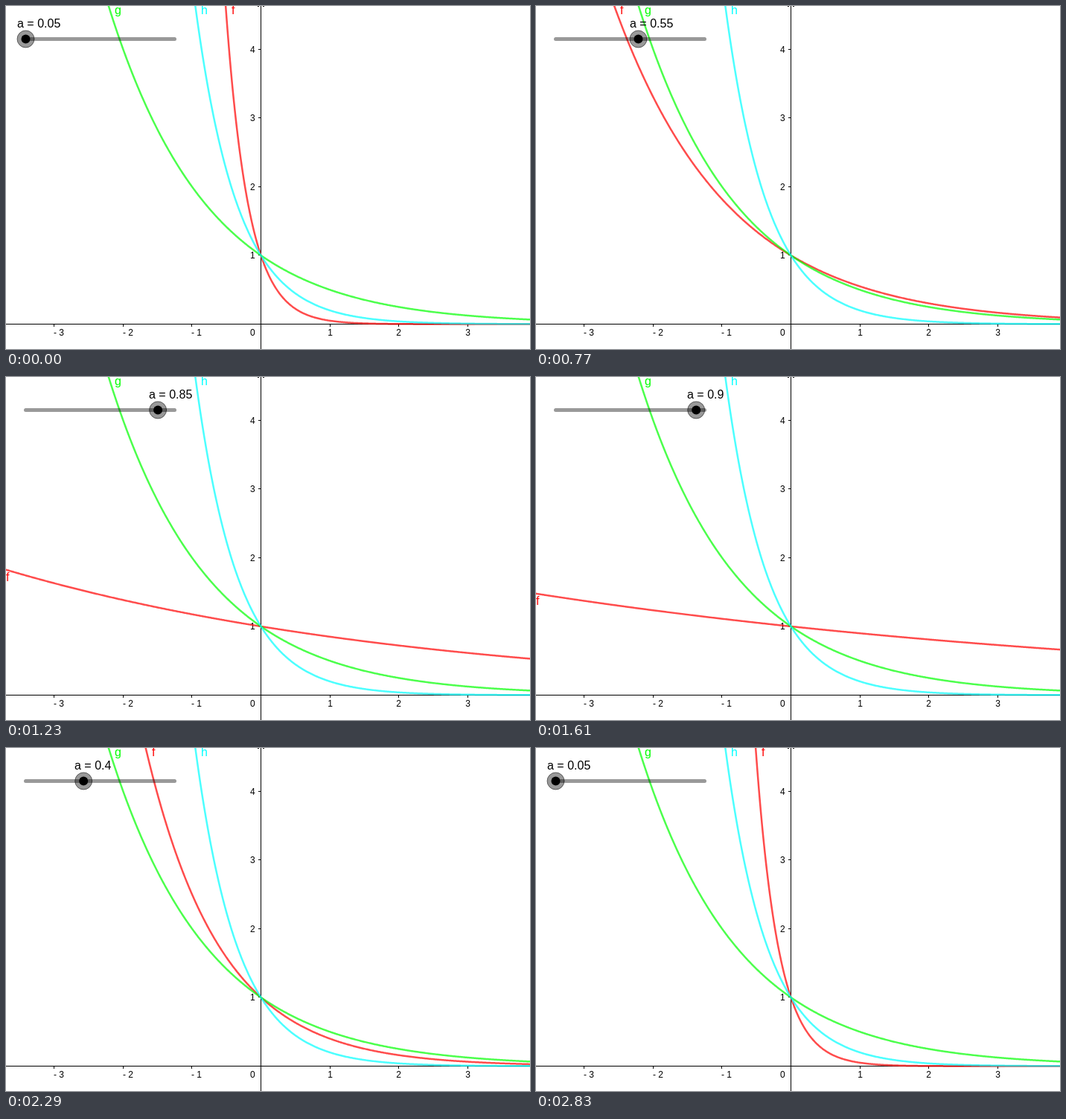
Animation of 704 by 462 pixels, one loop 2.91 s. Source, as an HTML page with a canvas:

```html
<!DOCTYPE html>
<html lang="en">
<head>
<meta charset="utf-8">
<title>Exponential functions</title>
<style>
  html, body { margin: 0; width: 704px; height: 462px; overflow: hidden; background: #fff; }
  canvas { display: block; }
</style>
</head>
<body>
<canvas id="stage" width="704" height="462"></canvas>
<script>
const W = 704, H = 462, OX = 342.5, OY = 428.5, UNIT = 92.57;
const FONT = '"Liberation Sans", Arial, sans-serif';
const ctx = document.getElementById('stage').getContext('2d');

// How long each slider value holds, in 10 ms
const holds = [8, 8, 8, 8, 8, 8, 7, 7, 8, 7, 8, 8, 7, 8, 8, 7, 7, 7, 17,
               8, 7, 7, 8, 7, 7, 8, 8, 8, 7, 7, 8, 7, 8, 8, 8, 8, 8];
const LOOP = 10 * holds.reduce((sum, h) => sum + h, 0);
const PEAK = 18;

function valueAt(ms) {
  let step = 0, end = holds[0] * 10;
  while (ms >= end && step < holds.length - 1) end += holds[++step] * 10;
  return (1 + PEAK - Math.abs(step - PEAK)) / 20;
}

function text(str, x, y, size, color = '#000', align = 'left') {
  ctx.font = size + 'px ' + FONT;
  ctx.textAlign = align;
  ctx.fillStyle = color;
  ctx.fillText(str, x, y);
}

function axes() {
  ctx.fillStyle = '#000';
  ctx.fillRect(0, 428, W, 1);
  ctx.fillRect(342, 0, 1, H);
  ctx.fillRect(338, 0, 2, 1);
  ctx.fillRect(345, 0, 2, 1);
  for (let n = -3; n <= 3; n++) {
    if (!n) continue;
    const x = Math.floor(OX + n * UNIT);
    ctx.fillStyle = '#000';
    ctx.fillRect(x, 428, 1, 4);
    if (n < 0) text('- ' + -n, x, 444, 12);
    else text(n, x + 0.5, 444, 12, '#000', 'center');
  }
  for (let n = 1; n <= 4; n++) {
    const y = Math.floor(OY - n * UNIT);
    ctx.fillStyle = '#000';
    ctx.fillRect(339, y, 4, 1);
    text(n, 328, y + 5, 12);
  }
  text('0', 328, 444, 12);
}

function curve(base, rgb) {
  const xFor = y => OX + UNIT * Math.log((OY - y) / UNIT) / Math.log(base);
  const yFor = x => OY - UNIT * Math.pow(base, (x - OX) / UNIT);
  ctx.beginPath();
  for (let x = Math.max(-2, xFor(-40)); x < W + 3; x++) ctx.lineTo(x, yFor(x));
  ctx.strokeStyle = `rgba(${rgb},0.7)`;
  ctx.lineWidth = 2.5;
  ctx.lineJoin = 'round';
  ctx.stroke();
  return { top: xFor(0), left: yFor(0) };
}

function label(name, edge, rgb) {
  const fromTop = edge.top > 0;
  const x = fromTop ? Math.round(edge.top + 8) : 0;
  const y = fromTop ? 11 : Math.round(edge.left + 15);
  text(name, x, y, 16, `rgb(${rgb})`);
}

function disc(x, y, r, fill) {
  ctx.beginPath();
  ctx.arc(x, y, r, 0, 2 * Math.PI);
  ctx.fillStyle = fill;
  ctx.fill();
}

function slider(a) {
  const x = 26.5 + 222 * (a - 0.05), y = 44.5;
  ctx.beginPath();
  ctx.moveTo(26.5, y);
  ctx.lineTo(226.5, y);
  ctx.lineCap = 'round';
  ctx.lineWidth = 5;
  ctx.strokeStyle = 'rgba(0,0,0,0.4)';
  ctx.stroke();
  disc(x, y, 11.5, 'rgba(0,0,0,0.4)');
  ctx.lineWidth = 1;
  ctx.strokeStyle = 'rgba(0,0,0,0.5)';
  ctx.stroke();
  disc(x, y, 6, '#000');
  text('a = ' + a, Math.round(x - 12), 29, 16);
}

function draw(ms) {
  const a = valueAt(ms);
  const graphs = [['f', a, '255,0,0'], ['g', 0.5, '0,255,0'], ['h', 0.2, '0,255,255']];
  ctx.fillStyle = '#fff';
  ctx.fillRect(0, 0, W, H);
  axes();
  for (const [name, base, rgb] of graphs) label(name, curve(base, rgb), rgb);
  slider(a);
}

function tick() {
  draw(performance.now() % LOOP);
  requestAnimationFrame(tick);
}
tick();
</script>
</body>
</html>
```
